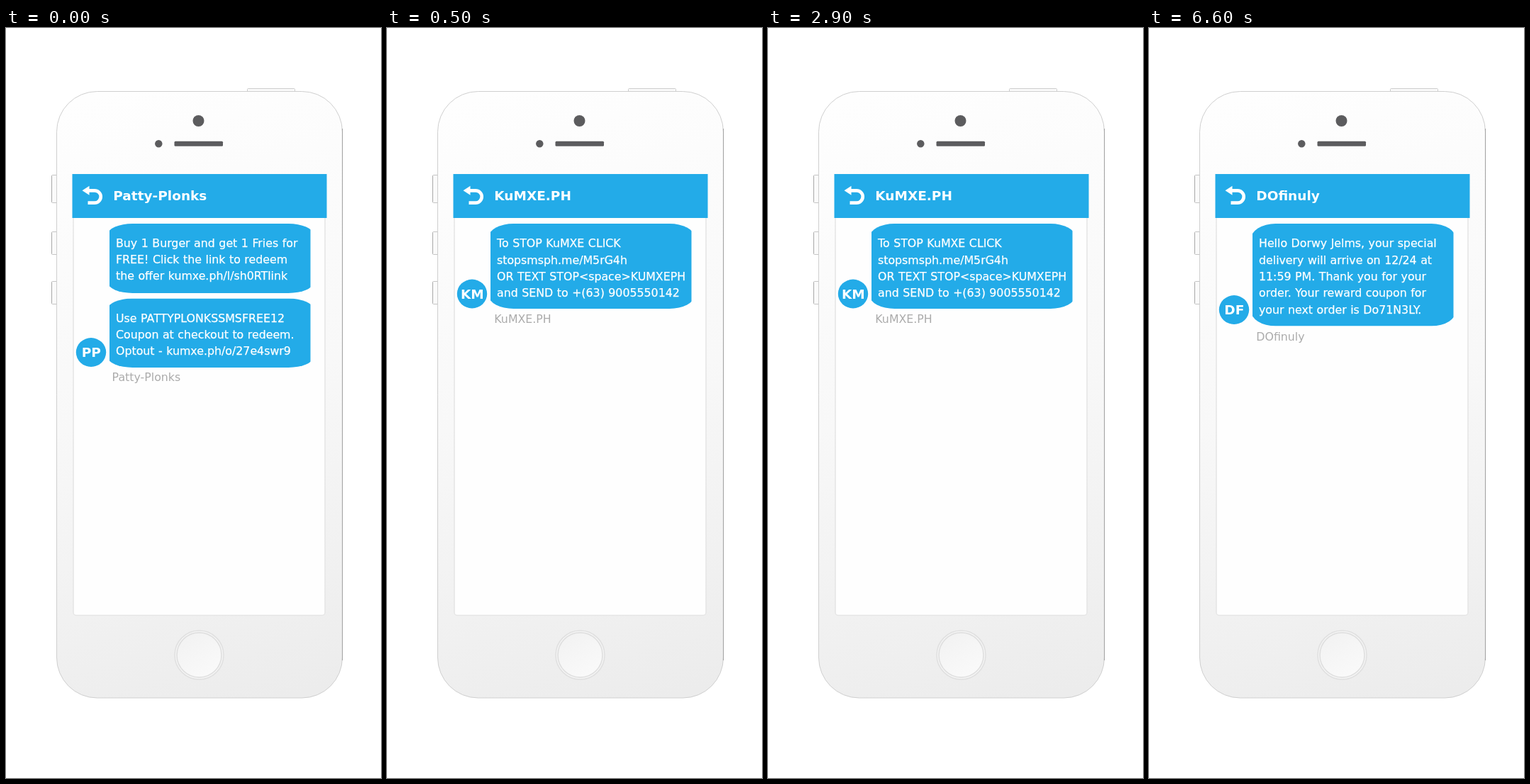
Recreate the animation shown at these times as an HTML page with a canvas. Size 529 by 1058 pixels, loop 8 s.

```html
<!DOCTYPE html>
<html lang="en">
<head>
<meta charset="utf-8">
<title>Text message previews</title>
<style>
  html, body { margin: 0; width: 100%; height: 100%; overflow: hidden; background: #fff; }
  canvas { display: block; }
</style>
</head>
<body>
<canvas id="stage" width="529" height="1058"></canvas>
<script>
const ctx = document.getElementById('stage').getContext('2d');
const BLUE = '#23abe8';
const LOOP = 8000;
const BODY_FONT = '15.8px "DejaVu Sans", sans-serif';
const BOLD_FONT = 'bold 18.5px "DejaVu Sans", sans-serif';

const scenes = [
  {
    until: 500, sender: 'Patty-Plonks', initials: 'PP', avatarY: 457.5,
    labelX: 149.6, labelY: 498,
    bubbles: [
      { y: 276, h: 98, step: 23, lines: [
        'Buy 1 Burger and get 1 Fries for',
        'FREE! Click the link to redeem',
        'the offer kumxe.ph/l/sh0RTlink'] },
      { y: 381.5, h: 97.5, step: 23.3, lines: [
        'Use PATTYPLONKSSMSFREE12',
        'Coupon at checkout to redeem.',
        'Optout - kumxe.ph/o/27e4swr9'] },
    ],
  },
  {
    until: 4500, sender: 'KuMXE.PH', initials: 'KM', avatarY: 375,
    labelX: 151.3, labelY: 416,
    bubbles: [
      { y: 276, h: 120, step: 23.3, lines: [
        'To STOP KuMXE CLICK',
        'stopsmsph.me/M5rG4h',
        'OR TEXT STOP<space>KUMXEPH',
        'and SEND to +(63) 9005550142'] },
    ],
  },
  {
    until: LOOP, sender: 'DOfinuly', initials: 'DF', avatarY: 397.5,
    labelX: 151.3, labelY: 441,
    bubbles: [
      { y: 276, h: 144.5, step: 23.3, lines: [
        'Hello Dorwy Jelms, your special',
        'delivery will arrive on 12/24 at',
        '11:59 PM. Thank you for your',
        'order. Your reward coupon for',
        'your next order is Do71N3LY.'] },
    ],
  },
];

function paint(fill, stroke, width = 1) {
  if (fill) { ctx.fillStyle = fill; ctx.fill(); }
  if (stroke) { ctx.strokeStyle = stroke; ctx.lineWidth = width; ctx.stroke(); }
}

function box(x, y, w, h, radius, fill, stroke, width) {
  ctx.beginPath();
  ctx.roundRect(x, y, w, h, radius);
  paint(fill, stroke, width);
}

function oval(x, y, rx, ry, fill, stroke, width) {
  ctx.beginPath();
  ctx.ellipse(x, y, rx, ry, 0, 0, Math.PI * 2);
  paint(fill, stroke, width);
}

// A nonzero weight thickens the letters slightly.
function text(str, x, y, font, color, { align = 'left', weight = 0 } = {}) {
  ctx.font = font;
  ctx.fillStyle = ctx.strokeStyle = color;
  ctx.textAlign = align;
  ctx.wordSpacing = '0.5px';
  ctx.fillText(str, x, y);
  if (weight) {
    ctx.lineWidth = weight;
    ctx.strokeText(str, x, y);
  }
}

function gradient(x0, y0, x1, y1, ...colors) {
  const g = ctx.createLinearGradient(x0, y0, x1, y1);
  colors.forEach((c, i) => g.addColorStop(i / (colors.length - 1), c));
  return g;
}

function drawPhone() {
  for (const [y, h] of [[207.5, 39], [287.5, 32], [357.5, 32]]) {
    box(64.5, y, 8, h, 1, '#fafafa', '#c4c4c4');
    box(64, y + 1, 1, h - 2, 0, '#a8a8a8');
  }
  box(340.5, 85.5, 67, 6, 1, '#fafafa', '#cccccc');

  box(71.5, 89.5, 403, 855.5, 57, gradient(160, 89, 390, 945, '#fefefe', '#f8f8f8', '#ececec'), '#cfcfcf');
  box(474, 142, 1, 750, 0, '#a0a0a0');

  oval(271.5, 131, 8, 8, '#5c5c5e');
  oval(215.3, 163.3, 5.2, 5.2, '#5c5c5e');
  box(237.5, 159.8, 68.5, 7, 1.5, '#5c5c5e');

  box(95, 207, 355, 621.5, 4, '#fefefe', '#e5e5e5', 1.5);

  oval(272.5, 884.5, 34.5, 34.5, '#f4f4f4', '#e0e0e0', 1.5);
  oval(272.5, 884.5, 31.5, 31.5, gradient(255, 853, 290, 916, '#f2f2f2', '#fafafa'), '#dedede', 1.5);
}

function drawHeader(title) {
  box(93.5, 206, 359, 62, 0, BLUE);

  ctx.beginPath();
  ctx.moveTo(116, 229.3);
  ctx.lineTo(125, 229.3);
  ctx.arc(125, 238, 8.7, -Math.PI / 2, Math.PI / 2);
  ctx.lineTo(115.5, 246.7);
  paint(null, '#fff', 4.7);

  ctx.beginPath();
  ctx.moveTo(107.5, 229.3);
  ctx.lineTo(117.5, 222.8);
  ctx.lineTo(117.5, 235.8);
  paint('#fff');

  text(title, 151.3, 243, BOLD_FONT, '#fff');
}

function drawBubble({ y, h, step, lines }) {
  // The rounded shape is wider than its visible part, which cuts the sides straight.
  ctx.save();
  ctx.beginPath();
  ctx.rect(146, y, 283.5, h);
  ctx.clip();
  box(143.5, y, 290, h, { x: 35, y: h * 0.155 }, BLUE);
  ctx.restore();
  lines.forEach((line, i) =>
    text(line, 155, Math.round(y + 33.3 + i * step), BODY_FONT, '#fff', { weight: 0.25 }));
}

function drawScene(scene) {
  ctx.fillStyle = '#fff';
  ctx.fillRect(0, 0, 529, 1058);
  drawPhone();
  drawHeader(scene.sender);
  scene.bubbles.forEach(drawBubble);
  oval(120, scene.avatarY, 21.2, 20.4, BLUE);
  text(scene.initials, 120.3, Math.round(scene.avatarY + 6.8), BOLD_FONT, '#fff', { align: 'center' });
  text(scene.sender, scene.labelX, scene.labelY, BODY_FONT, '#ababab');
}

let start;
function tick(now) {
  start ??= now;
  const time = (now - start) % LOOP;
  drawScene(scenes.find(scene => time < scene.until));
  requestAnimationFrame(tick);
}
requestAnimationFrame(tick);
</script>
</body>
</html>
```
